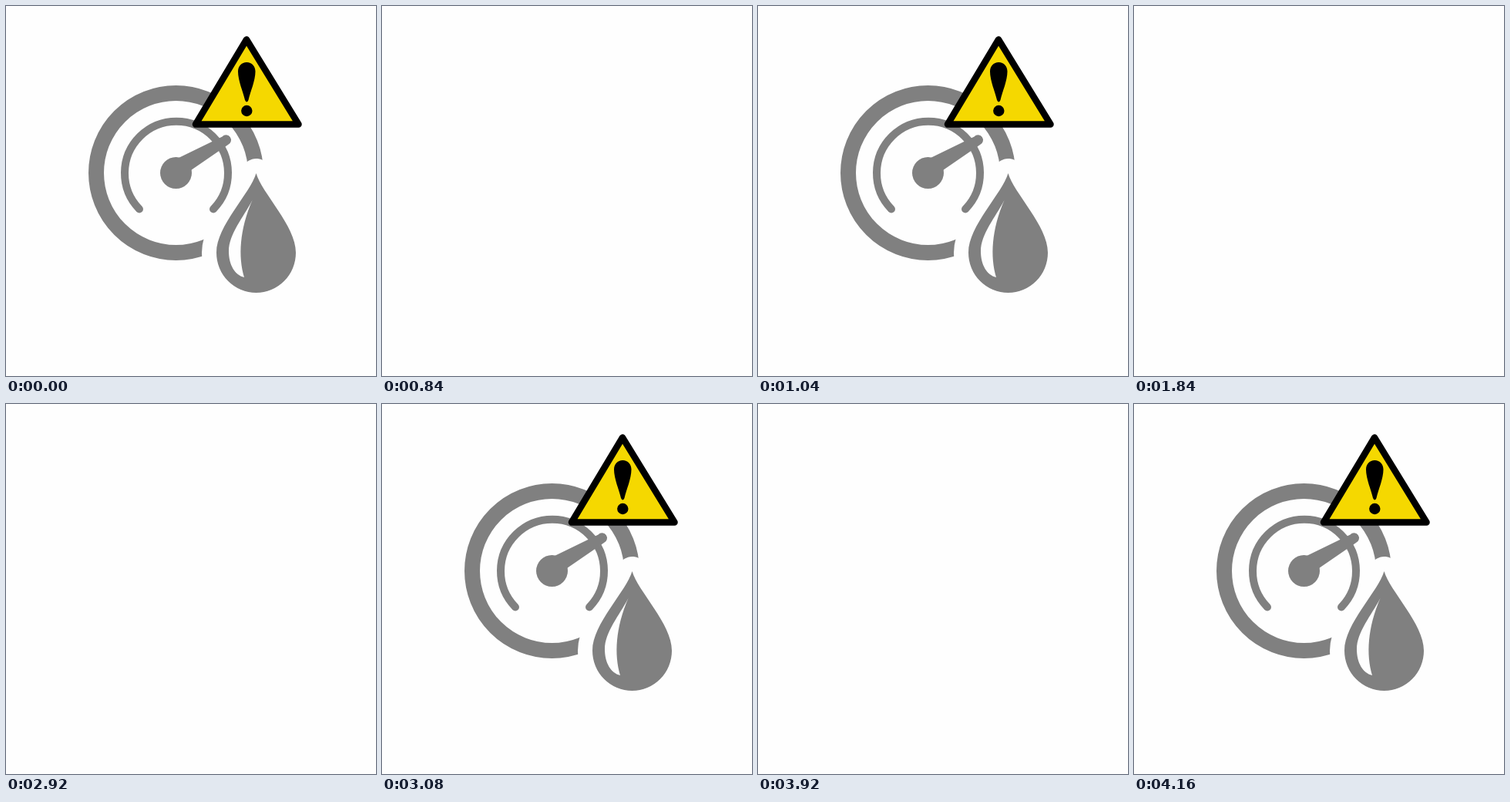
Recreate the animation shown at these times as an HTML page. Size 480 px wide and 480 px high, loop 4960 ms.

```html
<!DOCTYPE html>
<html lang="en">
<head>
<meta charset="utf-8">
<title>Blinking gauge warning</title>
<style>
  html, body { margin: 0; width: 100%; height: 100%; overflow: hidden; background: #fefefe; }
  svg { display: block; width: 100%; height: 100%; }
  .grey { fill: #808080; }
  .line { fill: none; stroke: #808080; }
  .paper { fill: #fefefe; }
  .halo { fill: #fefefe; stroke: #fefefe; stroke-width: 38; stroke-linejoin: round; }
  .sign { fill: #f5d800; stroke: #000; stroke-width: 8.5; stroke-linejoin: round; }
</style>
</head>
<body>
<svg viewBox="0 0 480 480">
  <defs>
    <path id="drop" d="M324.5 217C317 243 273 285 273 320A51.5 52 0 0 0 376 320C376 285 332 243 324.5 217Z"/>
  </defs>
  <g id="icon">
    <circle class="line" cx="220.5" cy="216.5" r="103.5" stroke-width="20"/>
    <use href="#drop" class="halo"/>
    <path class="line" d="M173 263.5A67 67 0 1 1 269 263.5" stroke-width="10" stroke-linecap="round"/>
    <circle class="grey" cx="220.5" cy="216.5" r="20.5"/>
    <path class="grey" d="M224 197L280.5 169.5A6.6 6.6 0 1 1 288 180L240 213Z"/>
    <use href="#drop" class="grey"/>
    <path class="paper" d="M319.5 252C308 274 289 296 289 318C289 336 297 349 309 352C301 325 303 290 319.5 252Z"/>
    <path class="sign" d="M312 43.5L246 153.5H379.5Z"/>
    <path d="M312.3 73C319 73 323.5 78 323.5 85C323.5 97 317 111 314.5 122Q312.3 127 310 122C307.5 111 301 97 301 85C301 78 305.5 73 312.3 73Z"/>
    <circle cx="312.3" cy="136" r="7.2"/>
  </g>
</svg>
<script>
  const LOOP = 4960;
  // [time in ms, opacity]
  const steps = [
    [0, 1], [840, 0], [1040, 1], [1840, 0], [2080, 1],
    [2920, 0], [3080, 1], [3920, 0], [4160, 1], [LOOP, 1]
  ];
  document.getElementById('icon').animate(
    steps.map(([time, opacity]) => ({ offset: time / LOOP, opacity, easing: 'steps(1, end)' })),
    { duration: LOOP, iterations: Infinity }
  );
</script>
</body>
</html>
```
